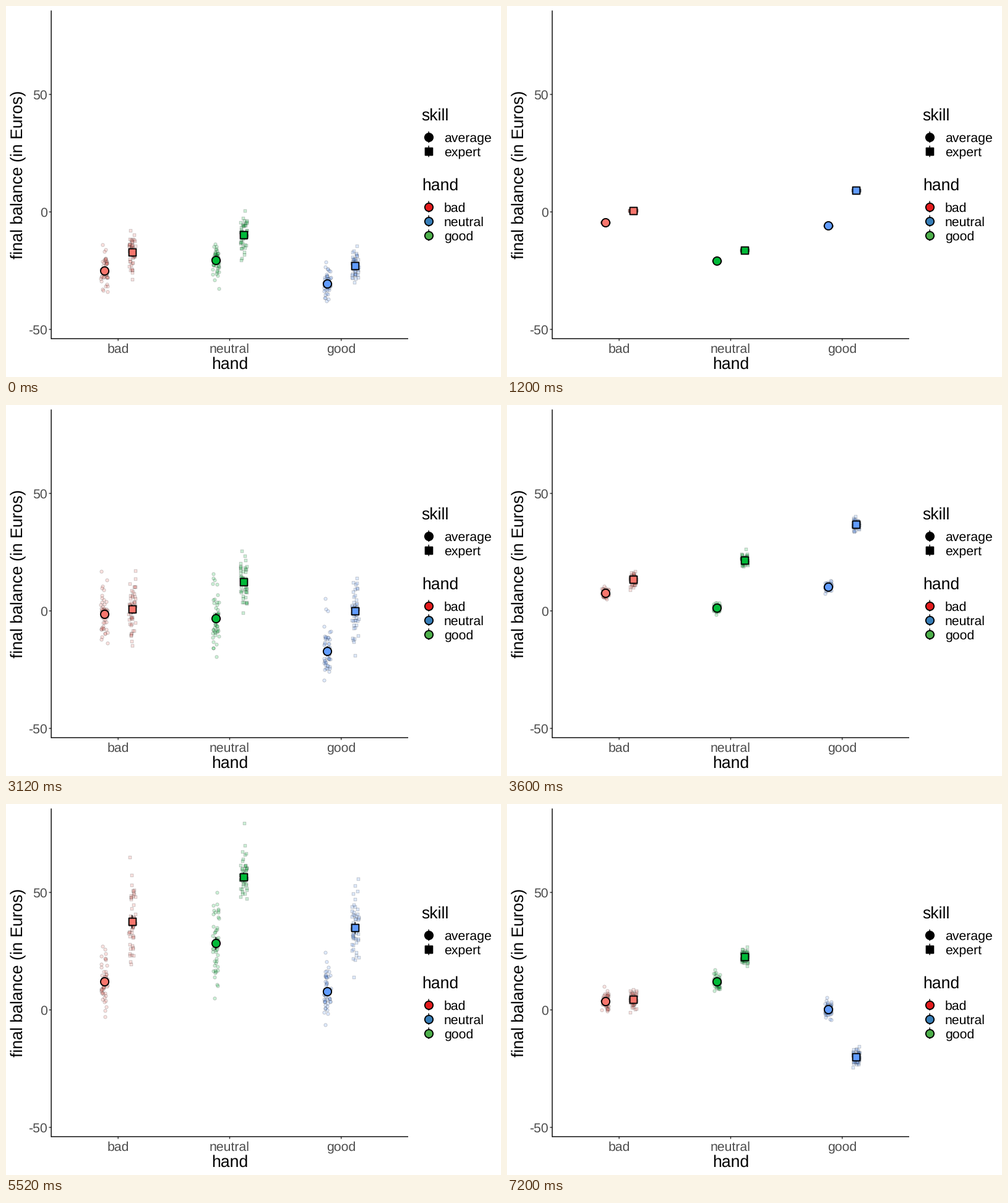
A matplotlib script for the animation above (8000 ms loop, 800 px wide and 600 px high).

```python
import numpy as np
import matplotlib.pyplot as plt
from matplotlib.animation import FuncAnimation
from matplotlib.colors import to_rgba

W, H, DPI = 800, 600, 100
STEP_MS = 400
HOLD = 3        # animation steps per round
FRAMES = 20
N = 50          # players per group

LEFT, RIGHT, TOP, BOTTOM = 73.1, 650, 7.3, 538
HANDS = ["bad", "neutral", "good"]
HAND_X = [181.2, 361.5, 541.7]
DODGE = 22.5
JITTER = 5.5
FILLS = ["#F8766D", "#00BA38", "#619CFF"]
KEY_FILLS = ["#E41A1C", "#377EB8", "#4DAF4A"]
LINE = 1.42

# (mean, lowest, highest) balance per round; average then expert for each hand
ROUNDS = [
    [(-24.9, -33.9, -13.9), (-17.0, -28.8, -8.0), (-20.6, -32.5, -13.8),
     (-9.8, -20.6, 0.6), (-30.4, -37.9, -21.3), (-22.9, -30.1, -14.5)],
    [(-4.5, -4.8, -4.2), (0.6, 0.3, 0.9), (-20.9, -21.2, -20.6),
     (-16.3, -16.7, -15.9), (-5.9, -6.2, -5.6), (9.2, 8.8, 9.6)],
    [(-1.3, -13.6, 16.8), (0.7, -14.7, 17.1), (-3.1, -19.6, 15.9),
     (12.5, -0.8, 25.5), (-17.1, -29.5, 5.2), (-0.1, -18.9, 13.9)],
    [(7.6, 5.1, 10.6), (13.4, 8.9, 16.9), (1.3, -1.6, 3.5),
     (21.7, 19.0, 26.2), (10.3, 7.5, 12.9), (36.8, 33.6, 40.3)],
    [(12.1, -2.8, 27.1), (37.6, 19.4, 65.1), (28.3, 4.9, 50.0),
     (56.6, 47.5, 79.4), (7.9, -6.3, 24.6), (34.9, 14.0, 55.7)],
    [(1.3, -30.4, 38.8), (-0.4, -47.6, 51.6), (6.2, -32.2, 46.7),
     (9.9, -19.1, 57.4), (0.3, -33.4, 29.5), (-10.0, -39.2, 47.6)],
    [(3.7, -0.4, 10.1), (4.5, -1.1, 8.8), (12.0, 8.2, 17.1),
     (22.6, 18.7, 26.8), (0.3, -4.2, 5.3), (-20.0, -24.5, -15.4)],
]

plt.rcParams["font.family"] = "Liberation Sans"
plt.rcParams["text.hinting"] = "none"


def pt(px):
    return px * 72 / DPI


def y_px(euros):
    return 333 - 3.8 * np.asarray(euros)


def spread(lo, hi):
    return (hi - lo) / 4.6


def sample(rng, mean, lo, hi):
    """Normal balances folded into [lo, hi], with both ends reached."""
    z = rng.standard_normal(N)
    v = mean + spread(lo, hi) * (z - z.mean()) / z.std()
    v = np.where(v < lo, 2 * lo - v, v)
    v = np.where(v > hi, 2 * hi - v, v)
    low, high = v.argmin(), v.argmax()
    v[low], v[high] = lo, hi
    return v


fig = plt.figure(figsize=(W / DPI, H / DPI), dpi=DPI, facecolor="white")
ax = fig.add_axes([0, 0, 1, 1])
ax.set(xlim=(0, W), ylim=(H, 0))
ax.axis("off")


def line(xs, ys, color="black", z=1):
    return ax.plot(xs, ys, color=color, lw=pt(LINE), solid_capstyle="butt",
                   snap=False, zorder=z)[0]


def text(x, y, s, px, color="black", ha="left", **kw):
    ax.text(x, y, s, fontsize=pt(px), color=color, ha=ha, va="baseline", **kw)


def markers(x, y, square, radius, stroke, fill, alpha=1, z=4):
    side = 2 * radius * (np.sqrt(np.pi / 4) if square else 1)
    dots = ax.scatter([x], [y], s=pt(side) ** 2, marker="s" if square else "o",
                      facecolor=[to_rgba(fill, alpha)],
                      edgecolor=[to_rgba("black", alpha)],
                      linewidth=pt(stroke), zorder=z)
    dots.set_snap(False)
    return dots


def big_marker(x, y, square, fill):
    return markers(x, y, square, 6.63, 1.89, fill)


def draw_axes():
    line([LEFT, LEFT], [TOP, BOTTOM + LINE / 2])
    line([LEFT, RIGHT], [BOTTOM, BOTTOM])
    for euros in (50, 0, -50):
        y = y_px(euros)
        line([LEFT - 3.67, LEFT], [y, y], "#333333", 0)
        text(66.5, y + 7.6, str(euros), 21.33, "#4D4D4D", "right")
    for x, name in zip(HAND_X, HANDS):
        line([x, x], [BOTTOM, BOTTOM + 3.67], "#333333", 0)
        text(x, 560.4, name, 21.33, "#4D4D4D", "center")
    mid_x, mid_y = (LEFT + RIGHT) / 2, (TOP + BOTTOM) / 2
    text(mid_x, 587.2, "hand", 26.67, ha="center")
    text(27, mid_y, "final balance (in Euros)", 26.67, ha="center",
         rotation=90, rotation_mode="anchor")


def draw_legend(title, y, entries):
    text(671.7, y, title, 26.67)
    for i, (name, square, fill) in enumerate(entries):
        key_y = y + 27 + 23.04 * i
        line([683.2, 683.2], [key_y - 9.2, key_y + 9.2], z=3)
        big_marker(683.2, key_y, square, fill)
        text(707.7, key_y + 7.8, name, 21.33)


draw_axes()
draw_legend("skill", 185, [("average", False, "black"),
                           ("expert", True, "black")])
draw_legend("hand", 297.6, [(n, False, c) for n, c in zip(HANDS, KEY_FILLS)])

rng = np.random.default_rng(12)
balances = [[sample(rng, *group) for group in groups] for groups in ROUNDS]
shifts = rng.uniform(-JITTER, JITTER, (len(ROUNDS), 6, N))

group_x, clouds, bars, means = [], [], [], []
for g in range(6):
    hand, expert = divmod(g, 2)
    x = HAND_X[hand] + (DODGE if expert else -DODGE)
    group_x.append(x)
    clouds.append(markers(x, 0, expert, 2.6, 0.94, FILLS[hand], 0.2, 2))
    bars.append(line([x, x], [0, 0], z=3))
    means.append(big_marker(x, 0, expert, FILLS[hand]))


def update(frame):
    r = frame // HOLD
    for g, (mean, lo, hi) in enumerate(ROUNDS[r]):
        x = group_x[g]
        clouds[g].set_offsets(np.column_stack([x + shifts[r, g],
                                               y_px(balances[r][g])]))
        ci = 1.96 * spread(lo, hi) / np.sqrt(N)
        bars[g].set_ydata(y_px([mean - ci, mean + ci]))
        means[g].set_offsets([(x, y_px(mean))])
    return clouds + bars + means


anim = FuncAnimation(fig, update, frames=FRAMES, interval=STEP_MS,
                     repeat=True, repeat_delay=0, blit=False)
plt.show()
```
